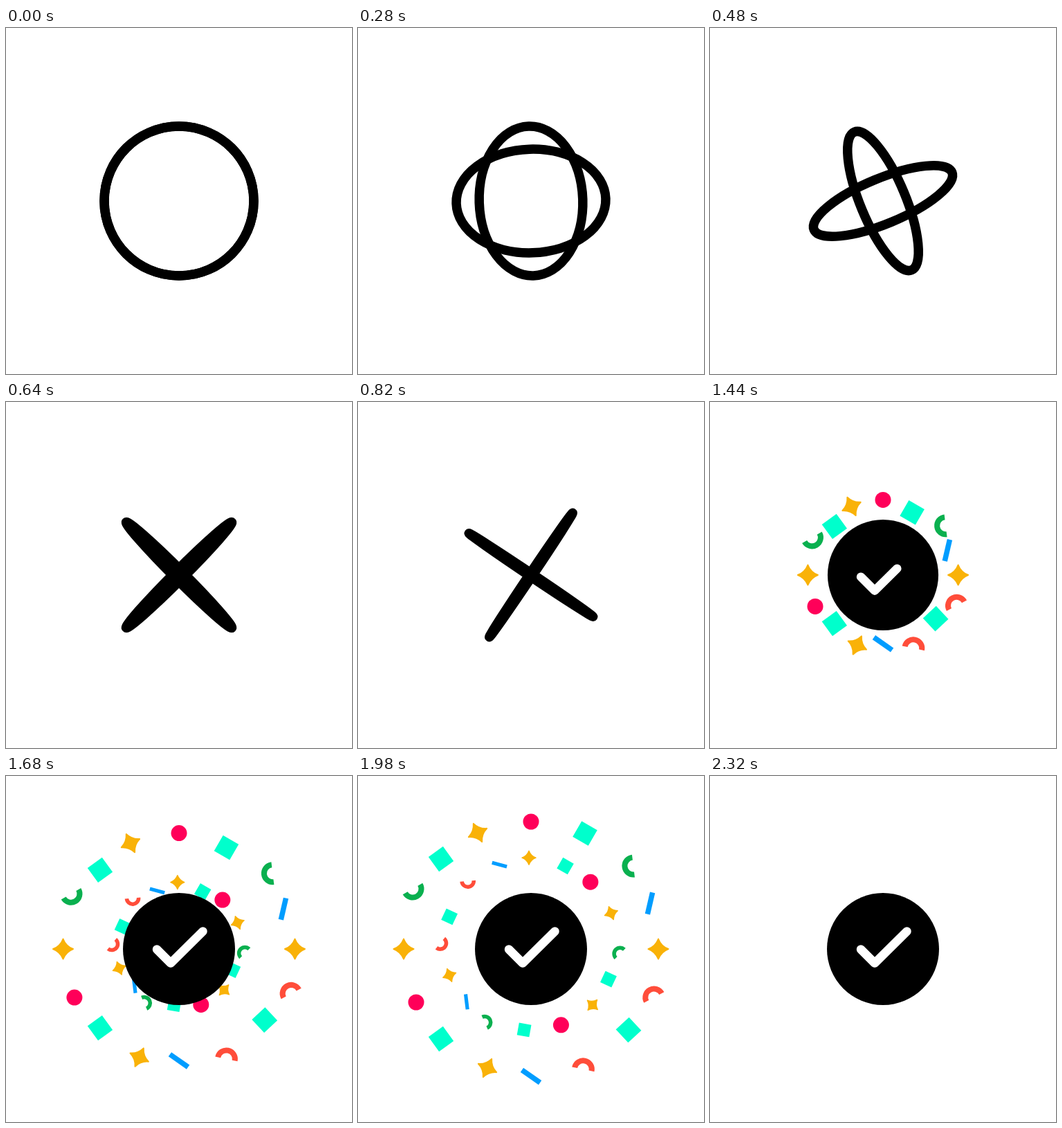
Animation, 500 px wide and 500 px high, one loop 2.82 s. Source, as an HTML page with a canvas:

```html
<!DOCTYPE html>
<html lang="en">
<head>
<meta charset="utf-8">
<title>Success check</title>
<style>
  html, body { margin: 0; width: 100%; height: 100%; overflow: hidden; background: #fff; }
  canvas { display: block; }
</style>
</head>
<body>
<canvas id="stage" width="500" height="500"></canvas>
<script>
const ctx = document.getElementById('stage').getContext('2d');
const LOOP = 2820;
const starPath = new Path2D('M0-14.5Q4-4 14.5 0Q4 4 0 14.5Q-4 4-14.5 0Q-4-4 0-14.5Z');
const pink = '#ff0059', teal = '#00ffcc', yellow = '#f9b208';
const green = '#0ab04f', blue = '#009dff', red = '#ff4d3a';

// Each piece: draw function, colour, resting x, y, rotation in degrees
const outer = [
  [dot, pink, 250, 66, 0], [square, teal, 328, 83, 30], [arc, green, 390, 131, -97],
  [bar, blue, 422, 184, -77], [star, yellow, 434, 250, 0], [arc, red, 424, 313, -28],
  [square, teal, 391, 367, -43], [arc, red, 327, 416, 12], [bar, blue, 250, 434, 35],
  [star, yellow, 187, 422, 25], [square, teal, 120, 380, -36], [dot, pink, 84, 327, 0],
  [star, yellow, 66, 250, 0], [arc, green, 83, 170, 150], [square, teal, 120, 120, -36],
  [star, yellow, 173, 82, -25]
];
const inner = [
  [star, yellow, 247, 118, 0], [square, teal, 300, 129, 30], [dot, pink, 336, 153, 0],
  [star, yellow, 366, 198, -20], [arc, green, 375, 253, -45], [square, teal, 363, 294, 25],
  [star, yellow, 339, 331, 42], [dot, pink, 293.5, 360, 0], [square, teal, 240, 368, 10],
  [arc, green, 188, 354, 66], [bar, blue, 156, 327, 83], [star, yellow, 132, 288, -20],
  [arc, red, 123, 245, 129], [square, teal, 131, 203, 25], [arc, red, 159, 157, 175],
  [bar, blue, 204, 127, 15]
];

function ease(t, start, duration) {
  const x = Math.min(1, Math.max(0, (t - start) / duration));
  return x * x * (3 - 2 * x);
}

function disc(x, y, r) {
  ctx.beginPath();
  ctx.arc(x, y, r, 0, 7);
  ctx.fill();
}

function dot(size) { disc(0, 0, 11.5 / size); }
function square() { ctx.fillRect(-13, -13, 26, 26); }
function bar() { ctx.fillRect(-16, -3.75, 32, 7.5); }
function star() {
  ctx.lineWidth = 2;
  ctx.fill(starPath);
  ctx.stroke(starPath);
}
function arc() {
  ctx.lineWidth = 8;
  ctx.beginPath();
  ctx.arc(0, 8, 12.5, Math.PI, 0);
  ctx.stroke();
}

// Squares and bars leave the centre a little later and fade last
function confetti(pieces, t, start, size) {
  for (const [draw, color, x, y, angle] of pieces) {
    const late = draw === square || draw === bar;
    const spread = ease(t, late ? start + 32 : start, 942);
    const fade = late ? ease(t, 2140, 180) : ease(t, 2000, 160);
    ctx.save();
    ctx.globalAlpha = ease(t, 1050, 100) * (1 - fade);
    ctx.translate(250 + (x - 250) * spread, 250 + (y - 250) * spread);
    ctx.rotate(angle * Math.PI / 180);
    ctx.scale(size, size);
    ctx.fillStyle = ctx.strokeStyle = color;
    draw(size);
    ctx.restore();
  }
}

function orbits(t) {
  const alpha = 1 - ease(t, 960, 160);
  if (!alpha) return;
  const minor = Math.max(0.1, 108 * ease(Math.abs(t - 756), 0, 752));
  const turn = (45 + 412 * ease(t, 0, 1400)) * Math.PI / 180;
  ctx.globalAlpha = alpha;
  ctx.strokeStyle = '#000';
  ctx.lineWidth = 13.5;
  for (const angle of [turn, turn + Math.PI / 2]) {
    ctx.beginPath();
    ctx.ellipse(250, 250, 108, minor, angle, 0, Math.PI * 2);
    ctx.closePath();
    ctx.stroke();
  }
  ctx.globalAlpha = 1;
}

function check(t) {
  const p = ease(t, 1160, 400);
  if (!p) return;
  const short = 28.3, length = 94, drawn = p * length;
  const a = Math.min(1, drawn / short);
  const b = Math.max(0, (drawn - short) / (length - short));
  const y = 250.5 + 10 * (1 - p);
  ctx.strokeStyle = '#fff';
  ctx.lineWidth = 12.5;
  ctx.lineCap = 'round';
  ctx.beginPath();
  ctx.moveTo(218, y);
  ctx.lineTo(218 + 20 * a, y + 20 * a);
  if (b) ctx.lineTo(238 + 46.5 * b, y + 20 - 46 * b);
  ctx.stroke();
  ctx.lineCap = 'butt';
}

function frame(now) {
  const t = now % LOOP;
  ctx.fillStyle = '#fff';
  ctx.fillRect(0, 0, 500, 500);
  ctx.lineJoin = 'round';
  orbits(t);
  confetti(outer, t, 913, 1);
  confetti(inner, t, 1060, 0.69);
  ctx.fillStyle = '#000';
  disc(250, 250, 81 * ease(t, 800, 685));
  check(t);
  requestAnimationFrame(frame);
}
requestAnimationFrame(frame);
</script>
</body>
</html>
```
